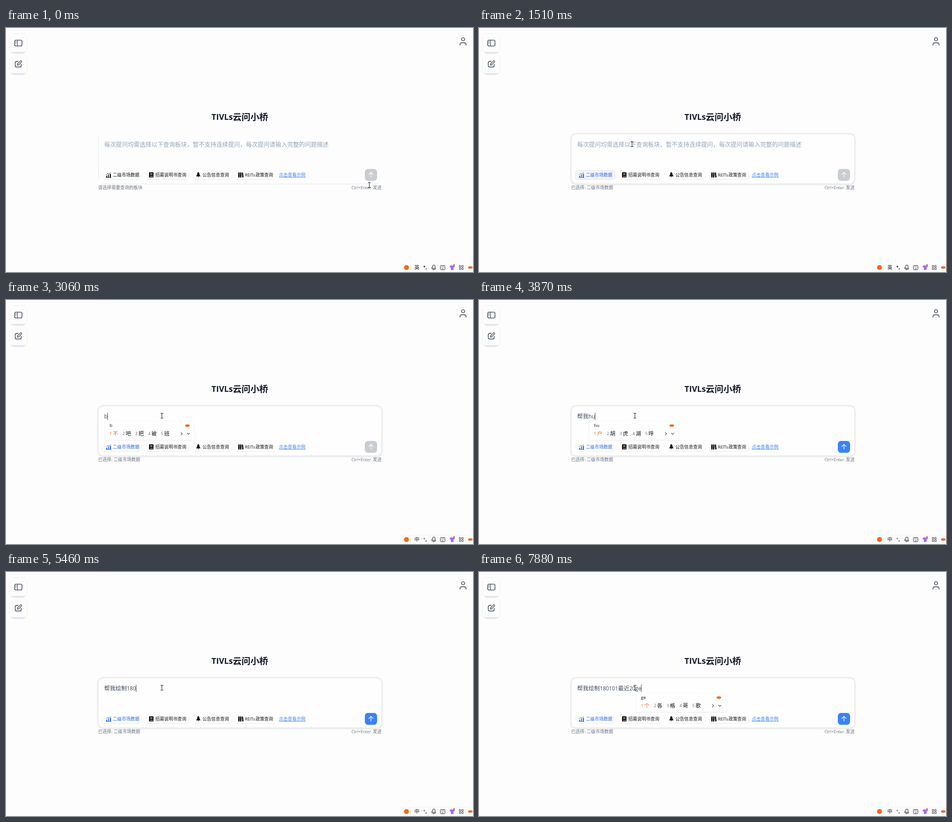
Animation, 1032 px wide and 542 px high, one loop 8 s. Source, as an HTML page:

```html
<!DOCTYPE html>
<html lang="zh-CN">
<head>
<meta charset="utf-8">
<title>Assistant prompt</title>
<style>
html, body { margin: 0; width: 100%; height: 100%; overflow: hidden; background: #fdfdfd; }
svg { display: block; width: 100%; height: 100%; }
text { font-family: "Noto Sans CJK SC", "Noto Sans CJK", "Noto Sans", sans-serif; white-space: pre; }
.latin { font-family: "Open Sans", "Noto Sans", sans-serif; }
.icon { fill: none; stroke: #4b5563; stroke-width: 1.7; stroke-linecap: round; stroke-linejoin: round; }
</style>
</head>
<body>
<svg viewBox="0 0 1032 542" preserveAspectRatio="xMinYMin meet">
  <defs>
    <filter id="soft" x="-10%" y="-20%" width="120%" height="150%">
      <feDropShadow dx="0" dy="1" stdDeviation="1.6" flood-opacity=".1"/>
    </filter>
    <g id="chart">
      <path d="M1 12V8h2v4zM5 12V6h2v6zM9 12V4h2.4v8z" fill="currentColor"/>
      <path d="M.5 6 4 3.5 7 4.5 11 .8M0 12.2h12" fill="none" stroke="currentColor"/>
    </g>
    <g id="book">
      <rect width="10" height="11.5" rx="1.5"/>
      <path d="M2.5 3h5M2.5 5.3h5M2 9.3h7" stroke="#fff" stroke-width=".9"/>
    </g>
    <path id="bell" d="M5 0c2.5 1 2.3 3.5 2.7 5.6L10 9.5H0L2.3 5.6C2.7 3.5 2.5 1 5 0zM3.5 10.3h3L5 12z"/>
    <g id="shelf">
      <path d="M0 0h3.3v11H0zM4 0h3.3v11H4zM8 .6l2.8-.6L12 10.5l-2.8.5z"/>
      <path d="M1 2.5h1.3M5 2.5h1.3M1 8.5h1.3M5 8.5h1.3" stroke="#fff" stroke-width=".8"/>
    </g>
    <path id="beam" d="M-3-5.5H3M0-5.5V5.5M-3 5.5H3" fill="none" stroke="#222" stroke-width="1.1"/>
    <path id="hand" d="M-2-7q1.5-1.3 2.5 0v4l4 1q1.5.5 1 3L4.5 6h-6L-5 1q0-2 3 0z"
      fill="#fff" stroke="#777" stroke-width=".8"/>
  </defs>
  <rect width="1032" height="542" fill="#fdfdfd"/>

  <g id="side"></g>
  <g class="icon">
    <rect x="19.3" y="27" width="16" height="13" rx="3"/>
    <path d="M25.3 27v13M21.8 30.5h.8M21.8 33.5h.8" stroke-width="1.4"/>
    <path d="M27 74.200h-3.500q-3 0-3 3v6.500q0 3 3 3h7q3 0 3-3V80.500"/>
    <path d="M25 82.500l.6-3 6.400-6.300q1.200-1 2.300 0t0 2.300L28 81.900z" stroke-width="1.5"/>
    <circle cx="1010" cy="25" r="3.5"/>
    <path d="M1003.3 38v-1q0-4.200 4.200-4.200h5q4.200 0 4.200 4.200v1"/>
  </g>

  <g fill="#111827" font-weight="700">
    <text class="latin" x="454" y="204" font-size="18">TIVLs</text>
    <text x="501" y="204.5" font-size="19.6">云问小桥</text>
  </g>
  <g id="scene"></g>
</svg>
<script>
const LOOP = 8000;
const BLUE = '#3b82f6', ORANGE = '#f26a1b';
const scene = document.getElementById('scene');

const text = (x, y, size, fill, content, extra = '') =>
  `<text x="${x}" y="${y}" font-size="${size}" fill="${fill}" ${extra}>${content}</text>`;
const line = (d, color, width = 1, extra = '') =>
  `<path d="${d}" fill="none" stroke="${color}" stroke-width="${width}" ${extra}/>`;
const box = (x, y, w, h, r, fill, extra = '') =>
  `<rect x="${x}" y="${y}" width="${w}" height="${h}" rx="${r}" fill="${fill}" ${extra}/>`;
const use = (id, x, y, color = '#111') =>
  `<use href="#${id}" x="${x}" y="${y}" fill="${color}" color="${color}"/>`;

document.getElementById('side').innerHTML = [12, 59].map(y =>
  box(9, y + 15, 36, 30.5, 9, '#e6e7e8') +
  box(7.5, y, 39, 41, 5, '#fdfdfd') +
  line(`M7.5 ${y + 6}v34M46.5 ${y + 6}v34`, '#f0f0f2') +
  (y < 20 ? line(`M13 ${y + .5}h29`, '#f0f0f1') : '')).join('');

// Each step keeps what the earlier ones set.
const steps = [
  [0, { card: false, cursor: ['beam', 803, 349], bar: '英', hover: false, chosen: false,
        hint: true, typed: '', caret: false, ime: null, send: false }],
  [270, { card: true, cursor: ['beam', 714, 306] }],
  [580, { cursor: ['beam', 311, 273] }],
  [920, { cursor: ['hand', 262, 333], hover: true }],
  [1240, { cursor: ['hand', 252, 327], bar: '' }],
  [1510, { cursor: ['beam', 338, 258], bar: '英', chosen: true }],
  [1790, { cursor: ['beam', 353, 244], bar: '', hover: false }],
  [2190, { cursor: ['beam', 345.5, 256] }],
  [2550, { cursor: ['beam', 344.5, 257], bar: '英' }],
  [2800, { bar: '中' }],
  [3060, { hint: false, caret: true, ime: ['b', '不 吧 把 被 班'] }],
  [3330, { ime: ['bang', '帮 棒 绑 邦 榜'] }],
  [3590, { ime: ['bangwo', '帮我 绑我 帮 棒 邦'] }],
  [3870, { typed: '帮我', send: true, ime: ['hu', '户 胡 虎 湖 呼'] }],
  [4130, { ime: ['huizh', '会整 绘制 会中 会 回'] }],
  [4400, { ime: ['huizhi', '绘制 会址 徽志 汇至 会'] }],
  [4660, { typed: '帮我绘制', ime: null }],
  [5190, { typed: '帮我绘制1' }],
  [5460, { typed: '帮我绘制180' }],
  [5720, { typed: '帮我绘制1801', caret: false }],
  [6000, { typed: '帮我绘制18010', caret: true }],
  [6280, { typed: '帮我绘制180101' }],
  [6540, { ime: ['zui', '最 嘴 醉 罪 咀'] }],
  [6810, { ime: ['zuijin', '最近 醉金 最紧 最 嘴'] }],
  [7070, { typed: '帮我绘制180101最近', ime: null }],
  [7340, { typed: '帮我绘制180101最近2' }],
  [7610, { typed: '帮我绘制180101最近20' }],
  [7880, { ime: ['ge', '个 各 格 哥 歌'] }]
];

function card(shown) {
  if (!shown) return line('M204.5 243V335M212 346.5H822', '#e5e6e8');
  return box(203.5, 235, 627, 111.5, 11, '#fefefe', 'stroke="#ebecee" stroke-width="2.5" filter="url(#soft)"');
}

function tools({ hover, chosen, send }) {
  const first = chosen ? '#2563eb' : '#111';
  const edges = [[213, 88], [310, 95], [413, 88], [505, 92]].map(([x, w], i) =>
    i === 0 && hover
      ? box(213.5, 316.5, w - 1, 20, 4, '#f5f5f6', 'stroke="#dedfe1"')
      : line(`M${x + 4} 336.5h${w - 8}`, '#e7e8ea') +
        line(`M${x + .5} 321v11M${x + w - .5} 321v11`, '#f1f1f3')).join('');
  return edges +
    use('chart', 220.5, 320, first) + text(236, 330, 9.8, first, '二级市场数据') +
    use('book', 316, 320.5) + text(330, 330, 9.8, '#111', '招募说明书查询') +
    use('bell', 420, 320) + text(434, 330, 9.8, '#111', '公告信息查询') +
    use('shelf', 513, 321) + text(528, 330, 9.2, '#111', 'REITs', 'class="latin"') +
    text(551.5, 330, 9.7, '#111', '政策查询') +
    text(603, 330, 9.8, BLUE, '点击查看示例') + line('M603 331.5h59', BLUE, .9) +
    box(793, 313, 27, 26.5, 7, send ? BLUE : '#c9ccd1') +
    line('M806.5 332V321M801.5 325.7l5-5 5 5', '#fff', 1.3) +
    text(203.5, 357.5, 9.8, '#6b7280', chosen ? '已选择: 二级市场数据' : '请选择需要查询的板块') +
    text(763.5, 357.5, 9.2, '#6b7280', 'Ctrl+Enter', 'class="latin"') +
    text(830, 357.5, 9.8, '#6b7280', '发送', 'text-anchor="end"');
}

function taskbar(mode) {
  if (!mode) return '';
  const ink = '#333';
  const chinese = mode === '中';
  const frame = chinese ? line('M1032 522.5H876q-4 0-4 4V542', '#f0f0f2') : '';
  const tiles = [[1001.5, 527.5], [1007, 527.5], [1001.5, 533], [1007, 533]]
    .map(([x, y]) => box(x, y, 3.5, 3.5, .5, 'none', `stroke="${ink}"`)).join('');
  const keys = line('M962 529.5h6M962 532h6', ink, 1.1, 'stroke-dasharray="1.2"');
  const dot = `<circle cx="924.5" cy="530" r="1.4" fill="${chinese ? 'none' : ink}" stroke="${ink}" stroke-width=".8"/>`;
  return frame +
    `<circle cx="885" cy="532" r="5.5" fill="${ORANGE}"/>` +
    text(902.5, 536, 11, '#111', mode, 'font-weight="500"') +
    dot + line('M928.5 533.5q1 1.5-1 3', ink, 1.3) +
    box(943, 526.5, 5, 8, 2.5, 'none', `stroke="${ink}" stroke-width="1.2"`) +
    line('M940.5 531q0 5.5 5 5.5 4 0 4-3.5M945 536.5v1.5', ink, 1.1) +
    box(960, 527.5, 10, 9.5, 1, 'none', `stroke="${ink}"`) + keys + line('M963 535h4', ink) +
    '<path d="M980 529l4-2 2 1.5 2-1.5 4 2-1.5 3-1.5-.5v6h-6v-6l-1.5.5z" fill="#9b6cf0"/>' +
    '<circle cx="990" cy="527" r="2.2" fill="#f4694c"/>' + tiles +
    `<ellipse cx="1026" cy="532" rx="5" ry="2.8" fill="${ORANGE}"/>`;
}

function imePanel(left, [keys, list]) {
  let x = left + 10, row = '';
  list.split(' ').forEach((word, i) => {
    const picked = i === 0;
    row += text(x, 299.5, 8.8, picked ? ORANGE : '#666', i + 1, 'class="latin"') +
      text(x + 7, 300.5, 11.8, picked ? ORANGE : '#111', word);
    x += 16.4 + 12 * word.length;
  });
  const right = x + 45;
  return box(left, 269, right - left, 41.5, 3, '#fefefe', 'filter="url(#soft)"') +
    text(left + 10, 282, 9.8, '#111', keys, 'class="latin" font-weight="500"') + row +
    line(`M${right - 29.5} 294l3 3-3 3M${right - 16} 295.5l3 3 3-3`, '#444', 1.1) +
    `<ellipse cx="${right - 15}" cy="279" rx="5" ry="2.8" fill="${ORANGE}"/>`;
}

// Han runs and Latin runs use different fonts and sizes.
const runs = value => value.replace(/[\x21-\x7e]+|[^\x21-\x7e]+/g, run =>
  /[\x21-\x7e]/.test(run)
    ? `<tspan class="latin" font-size="11.7">${run}</tspan>`
    : `<tspan>${run}</tspan>`);

function widthOf(value) {
  if (!value) return 0;
  scene.innerHTML = text(0, 0, 12.5, 'none', runs(value));
  return scene.firstChild.getComputedTextLength();
}

function draw(state) {
  const full = state.typed + (state.ime ? state.ime[0] : '');
  const start = 217 + widthOf(state.typed);
  const end = Math.round(217 + widthOf(full)) + .5;
  const [shape, x, y] = state.cursor;
  scene.innerHTML = card(state.card) + tools(state) +
    (state.hint
      ? text(217, 263, 13.05, '#94a3b8', '每次提问均需选择以下查询板块，暂不支持连续提问，每次提问请输入完整的问题描述')
      : text(217, 263, 12.5, '#3f4b5c', runs(full))) +
    (state.caret ? line(`M${end} 250.5V266.5`, '#444') : '') +
    (state.ime ? imePanel(Math.round(start + 2), state.ime) : '') +
    taskbar(state.bar) + `<use href="#${shape}" x="${x}" y="${y}"/>`;
}

let shown = -1;
const origin = performance.now();
function tick() {
  const time = (performance.now() - origin) % LOOP;
  const count = steps.filter(([at]) => at <= time).length;
  if (count !== shown) {
    shown = count;
    draw(Object.assign({}, ...steps.slice(0, count).map(step => step[1])));
  }
  requestAnimationFrame(tick);
}
tick();
</script>
</body>
</html>
```
